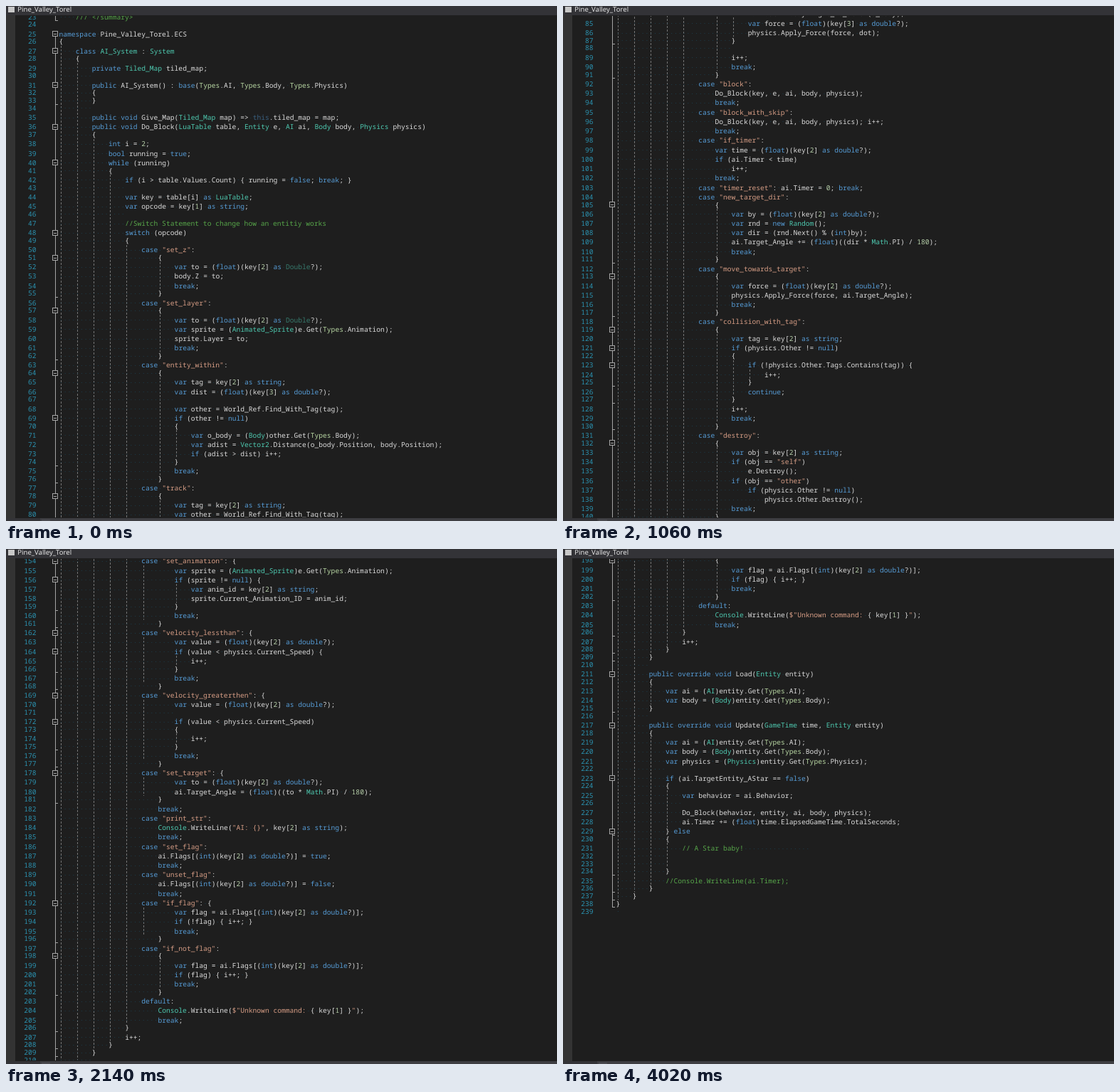
An HTML page with a canvas that plays this animation: 774 px wide and 724 px high, repeating every 4550 ms.

```html
<!DOCTYPE html>
<html lang="en">
<head>
<meta charset="utf-8">
<title>Code scroll</title>
<style>
html, body { margin: 0; width: 100%; height: 100%; overflow: hidden; background: #1e1e1e; }
canvas { display: block; }
</style>
</head>
<body>
<canvas id="stage" width="774" height="724"></canvas>
<script>
const code = `	/// </summary>

namespace Pine_Valley_Torel.ECS
{
	class AI_System : System
	{
		private Tiled_Map tiled_map;

		public AI_System() : base(Types.AI, Types.Body, Types.Physics)
		{
		}

		public void Give_Map(Tiled_Map map) => this.tiled_map = map;
		public void Do_Block(LuaTable table, Entity e, AI ai, Body body, Physics physics)
		{
			int i = 2;
			bool running = true;
			while (running)
			{
				if (i > table.Values.Count) { running = false; break; }

				var key = table[i] as LuaTable;
				var opcode = key[1] as string;

				//Switch Statement to change how an entitiy works
				switch (opcode)
				{
					case "set_z":
						{
							var to = (float)(key[2] as Double?);
							body.Z = to;
							break;
						}
					case "set_layer":
						{
							var to = (float)(key[2] as Double?);
							var sprite = (Animated_Sprite)e.Get(Types.Animation);
							sprite.Layer = to;
							break;
						}
					case "entity_within":
						{
							var tag = key[2] as string;
							var dist = (float)(key[3] as double?);

							var other = World_Ref.Find_With_Tag(tag);
							if (other != null)
							{
								var o_body = (Body)other.Get(Types.Body);
								var adist = Vector2.Distance(o_body.Position, body.Position);
								if (adist > dist) i++;
							}
							break;
						}
					case "track":
						{
							var tag = key[2] as string;
							var other = World_Ref.Find_With_Tag(tag);
							if (other != null)
							{
								var o_body = (Body)other.Get(Types.Body);
								var dot = body.Angle_To_Other(o_body);
								var force = (float)(key[3] as double?);
								physics.Apply_Force(force, dot);
							}

							i++;
							break;
						}
					case "block":
						Do_Block(key, e, ai, body, physics);
						break;
					case "block_with_skip":
						Do_Block(key, e, ai, body, physics); i++;
						break;
					case "if_timer":
						var time = (float)(key[2] as double?);
						if (ai.Timer < time)
							i++;
						break;
					case "timer_reset": ai.Timer = 0; break;
					case "new_target_dir":
						{
							var by = (float)(key[2] as double?);
							var rnd = new Random();
							var dir = (rnd.Next() % (int)by);
							ai.Target_Angle += (float)((dir * Math.PI) / 180);
							break;
						}
					case "move_towards_target":
						{
							var force = (float)(key[2] as double?);
							physics.Apply_Force(force, ai.Target_Angle);
							break;
						}
					case "collision_with_tag":
						{
							var tag = key[2] as string;
							if (physics.Other != null)
							{
								if (!physics.Other.Tags.Contains(tag)) {
									i++;
								}
								continue;
							}
							i++;
							break;
						}
					case "destroy":
						{
							var obj = key[2] as string;
							if (obj == "self")
								e.Destroy();
							if (obj == "other")
								if (physics.Other != null)
									physics.Other.Destroy();
							break;
						}
					case "face_move_dir": {
							var sprite = (Animated_Sprite)e.Get(Types.Animation);
							if (sprite != null)
							{

								if (physics.Velocity.X > 0)
									sprite.Scale = new Vector2(1, sprite.Scale.Y);
								else
									sprite.Scale = new Vector2(-1, sprite.Scale.Y);

							}
							break;
						}
					case "set_animation": {
							var sprite = (Animated_Sprite)e.Get(Types.Animation);
							if (sprite != null) {
								var anim_id = key[2] as string;
								sprite.Current_Animation_ID = anim_id;
							}
							break;
						}
					case "velocity_lessthan": {
							var value = (float)(key[2] as double?);
							if (value < physics.Current_Speed) {
								i++;
							}
							break;
						}
					case "velocity_greaterthen": {
							var value = (float)(key[2] as double?);

							if (value < physics.Current_Speed)
							{
								i++;
							}
							break;
						}
					case "set_target": {
							var to = (float)(key[2] as double?);
							ai.Target_Angle = (float)((to * Math.PI) / 180);
						}
						break;
					case "print_str":
						Console.WriteLine("AI: {}", key[2] as string);
						break;
					case "set_flag":
						ai.Flags[(int)(key[2] as double?)] = true;
						break;
					case "unset_flag":
						ai.Flags[(int)(key[2] as double?)] = false;
						break;
					case "if_flag": {
							var flag = ai.Flags[(int)(key[2] as double?)];
							if (!flag) { i++; }
							break;
						}
					case "if_not_flag":
						{
							var flag = ai.Flags[(int)(key[2] as double?)];
							if (flag) { i++; }
							break;
						}
					default:
						Console.WriteLine($"Unknown command: { key[1] }");
						break;
				}
				i++;
			}
		}

		public override void Load(Entity entity)
		{
			var ai = (AI)entity.Get(Types.AI);
			var body = (Body)entity.Get(Types.Body);
		}

		public override void Update(GameTime time, Entity entity)
		{
			var ai = (AI)entity.Get(Types.AI);
			var body = (Body)entity.Get(Types.Body);
			var physics = (Physics)entity.Get(Types.Physics);

			if (ai.TargetEntity_AStar == false)
			{
				var behavior = ai.Behavior;

				Do_Block(behavior, entity, ai, body, physics);
				ai.Timer += (float)time.ElapsedGameTime.TotalSeconds;
			} else
			{
				// A Star baby!${" ".repeat(16)}


			}
			//Console.WriteLine(ai.Timer);
		}
	}
}
`;

const ctx = document.getElementById("stage").getContext("2d");
const W = 774, H = 724, LOOP = 4550;
const FIRST = 23, CHAR = 5.79, LEFT = 74.5;
const TALL = 13.236, SHORT = 10.755, NOTCH = 3 * TALL;
const CODE_FONT = '9.65px "Noto Sans Mono", "DejaVu Sans Mono", monospace';
const UI_FONT = '9.6px "Open Sans", "Noto Sans", sans-serif';

const color = {
  plain: "#dcdcdc", keyword: "#569cd6", type: "#4ec9b0", enum: "#b8d7a3",
  string: "#d69d85", number: "#b5cea8", comment: "#57a64a",
  lineNo: "#2b91af", dot: "#1c3c4a", guide: "#747474", fold: "#a5a5a5"
};
const words = s => new Set(s.split(" "));
const keywords = words("namespace class private public void int bool while true if false break var as string switch case float double null new base default continue else override");
const types = words("AI_System System Tiled_Map LuaTable Entity AI Body Physics Animated_Sprite Vector2 Random Math Console GameTime");

function tint(word, before, after) {
  if (word.startsWith("//")) return color.comment;
  if (/^\$?"/.test(word)) return color.string;
  if (/^\d/.test(word)) return color.number;
  if (word === "this") return "#3a6080";
  if (word === "Double") return "#37796c";
  if (keywords.has(word)) return color.keyword;
  if (word === "Types") return color.enum;
  if (word === "AI_System" && after === "(") return color.plain;
  if (types.has(word) && before !== ".") return color.type;
  return color.plain;
}

function tokenize(text) {
  const found = text.matchAll(/\/\/.*|\$"[^{]*|"[^"]*"|"|\w+|[^\w\s"$]+/g);
  return [...found].map(m => {
    const end = m.index + m[0].length;
    return { col: m.index, text: m[0].trimEnd(), fill: tint(m[0], text[m.index - 1], text[end]) };
  });
}

// Lines without letters or digits are shorter than the others.
const raw = code.split("\n");
let y = 39.2 - 2 * TALL - SHORT;
const lines = raw.map((src, i) => {
  y += /\w/.test(src) ? TALL : SHORT;
  const next = raw.slice(i).find(s => s.trim());
  const depth = next ? next.match(/^\t*/)[0].length : 0;
  const text = next ? " ".repeat(depth * 4) + src.replace(/^\t+/, "") : " ";
  return { y, depth, text, body: src.trim(), tokens: tokenize(text) };
});

const blocks = [], open = [];
lines.forEach((line, i) => {
  if (line.body.startsWith("}")) blocks.push({ start: open.pop(), end: i });
  if (line.body.endsWith("{")) open.push(i);
});
for (const b of blocks) {
  const alone = lines[b.start].body === "{";
  b.head = alone && !lines[b.start - 1].body.endsWith(":") ? b.start - 1 : b.start;
}

// Wheel movement: [time, notches]
const wheel = [
  [210, 3], [290, 3], [590, 2], [670, 3], [750, 1], [980, 4], [1060, 3],
  [1360, 7], [1670, 5], [1750, 2], [1820, 1], [1990, 2], [2070, 3], [2140, 2],
  [2370, 4], [2460, 3], [2690, 4], [2770, 3]
];
// Pointer stops: [time, x, y]
const pointer = [[3530, 767, 652], [3620, 738, 711], [3700, 751, 703], [3850, 758, 680], [3930, 769, 653], [4020]];

const rect = (fill, x, y, w, h) => { ctx.fillStyle = fill; ctx.fillRect(x, y, w, h); };

function drawGuides(top) {
  for (const b of blocks) {
    if (b.end - b.start < 2) continue;
    const x = Math.floor(77.2 + lines[b.start].depth * 4 * CHAR);
    const from = lines[b.start].y + 6 - top, to = lines[b.end].y - 5 - top;
    if (to < 0 || from > H) continue;
    ctx.strokeStyle = color.guide;
    ctx.setLineDash([3, 2]);
    ctx.beginPath();
    ctx.moveTo(x + 0.5, Math.round(from));
    ctx.lineTo(x + 0.5, to);
    ctx.stroke();
  }
  ctx.setLineDash([]);
}

function drawFolds(top) {
  const at = i => Math.round(lines[i].y - top);
  const stem = (from, to) => rect(color.fold, 69, from, 1, to - from);
  const tick = i => rect(color.fold, 69, at(i) + 5, 4, 1);
  stem(at(0) - 8, at(0) + 6);
  tick(0);
  const outer = blocks[blocks.length - 1];
  stem(at(outer.head), at(outer.end) + 6);
  blocks.forEach(b => tick(b.end));
  for (const b of blocks) {
    const cy = at(b.head);
    rect(color.fold, 65, cy - 4, 8, 8);
    rect("#1e1e1e", 66, cy - 3, 6, 6);
    rect(color.fold, 67, cy, 4, 1);
  }
}

function drawLine(line, no, top) {
  const cy = line.y - top, base = cy + 3.4;
  if (cy < 0 || cy > H + 8) return;
  ctx.textAlign = "right";
  ctx.fillStyle = color.lineNo;
  ctx.fillText(no, 42.5, base);
  ctx.textAlign = "left";
  for (let c = 0; c < line.text.length; c++)
    if (line.text[c] === " ") rect(color.dot, LEFT + (c + 0.5) * CHAR - 0.5, Math.round(cy), 1, 1);
  for (const tok of line.tokens) {
    ctx.fillStyle = tok.fill;
    ctx.fillText(tok.text, LEFT + tok.col * CHAR, base);
  }
}

function drawFrame() {
  rect("#333337", 0, 0, W, 13);
  rect("#333333", 0, 13, 13, 707);
  rect("#c8c8c8", 3, 1, 9, 8);
  ctx.font = UI_FONT;
  ctx.fillStyle = "#f1f1f1";
  ctx.fillText("Pine_Valley_Torel", 16.3, 8.2);
  rect("#333337", 0, 720, 48, 4);
  rect("#3e3e42", 48, 720, W - 48, 4);
  rect("#4a4a4f", 50, 722, 12, 2);
}

function drawPointer(x, y) {
  const ink = "#d0d0d0";
  rect(ink, x, y - 6, 1, 12);
  for (const end of [y - 7, y + 6]) {
    rect(ink, x - 3, end, 3, 1);
    rect(ink, x + 1, end, 3, 1);
  }
}

function draw(notches, stop) {
  const top = notches * NOTCH;
  rect("#1e1e1e", 0, 0, W, H);
  ctx.save();
  ctx.beginPath();
  ctx.rect(13, 14, W - 13, 705);
  ctx.clip();
  ctx.font = CODE_FONT;
  drawGuides(top);
  drawFolds(top);
  lines.forEach((line, i) => drawLine(line, i + FIRST, top));
  ctx.restore();
  drawFrame();
  if (stop && stop.length > 1) drawPointer(stop[1], stop[2]);
}

let shown = "";
function tick() {
  const t = performance.now() % LOOP;
  const notches = wheel.reduce((sum, [at, n]) => sum + (t >= at ? n : 0), 0);
  const stop = pointer.filter(p => t >= p[0]).pop();
  const state = notches + "/" + stop;
  if (state !== shown) {
    shown = state;
    draw(notches, stop);
  }
  requestAnimationFrame(tick);
}

ctx.textRendering = "geometricPrecision";
ctx.lineWidth = 1;
tick();
</script>
</body>
</html>
```
